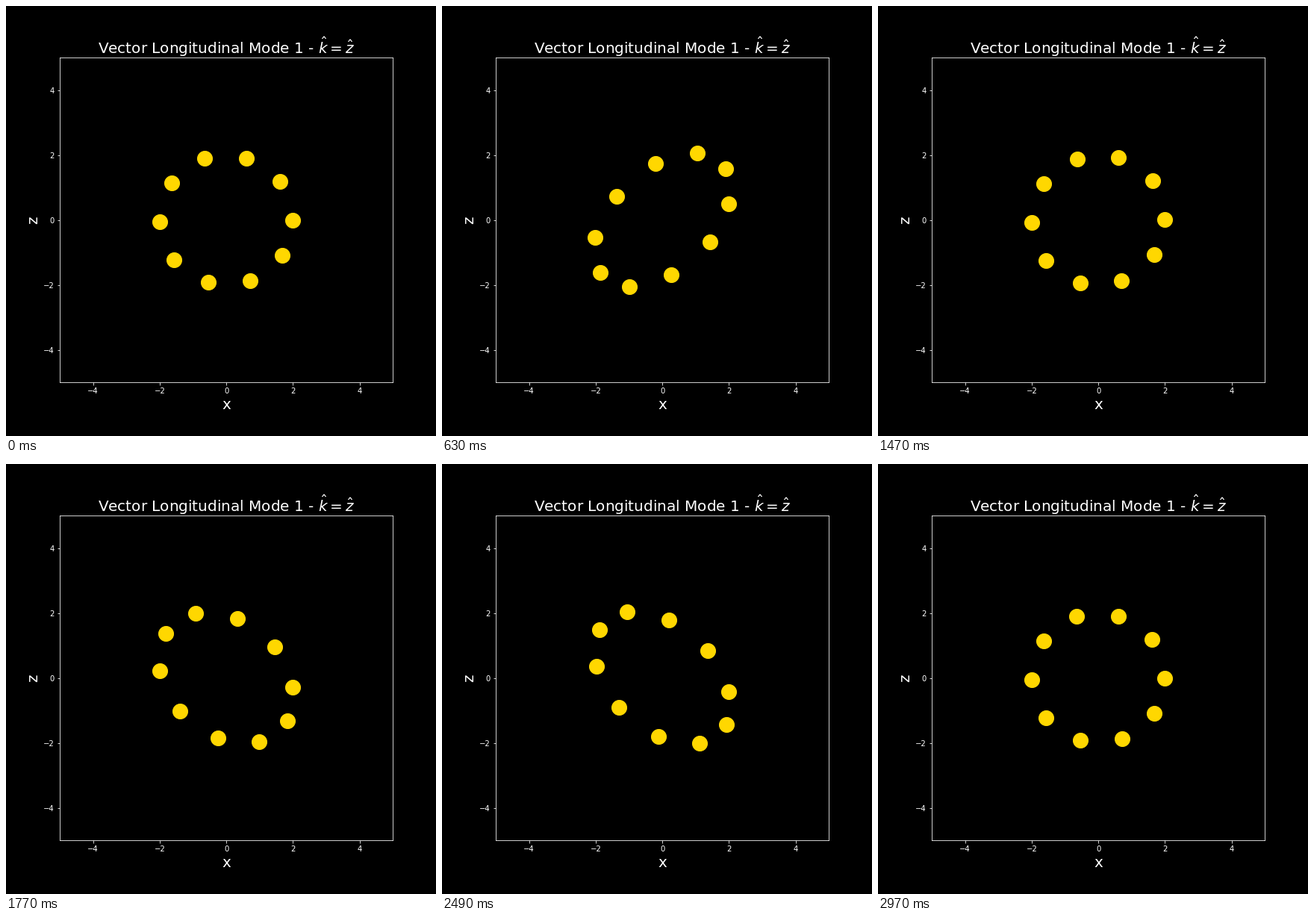
A matplotlib script that plays this animation: 576x576 px, repeating every 3000 ms.

```python
import numpy as np
import matplotlib.pyplot as plt
from matplotlib.animation import FuncAnimation

FRAMES = 100
INTERVAL = 30
RADIUS = 2.0
STRAIN = 0.25

plt.rcParams.update({
    "font.family": "DejaVu Sans",
    "font.size": 10,
    "mathtext.fontset": "dejavusans",
    "text.color": "white",
    "axes.edgecolor": "white",
    "axes.labelcolor": "white",
    "xtick.color": "white",
    "ytick.color": "white",
})

fig = plt.figure(figsize=(8, 8), dpi=72, facecolor="black")
ax = fig.add_axes([0.125, 0.125, 0.775, 0.755], facecolor="black")
ax.set(xlim=(-5, 5), ylim=(-5, 5),
       xticks=range(-4, 5, 2), yticks=range(-4, 5, 2))
ax.set_title(r"Vector Longitudinal Mode 1 - $\hat{k} = \hat{z}$", fontsize=20)
ax.set_xlabel("x", fontsize=20)
ax.set_ylabel("z", fontsize=20)

# Ring of test particles, every tenth point of a closed circle
theta = np.linspace(0, 2 * np.pi, 100)[::10]
x0, z0 = RADIUS * np.cos(theta), RADIUS * np.sin(theta)
phase = np.linspace(0, 2 * np.pi, FRAMES)

dots, = ax.plot(x0, z0, "o", color="gold", markersize=20, markeredgewidth=1)


def update(i):
    """Shear the ring in the x-z plane."""
    h = STRAIN * np.sin(phase[i])
    dots.set_data(x0 + h * z0, z0 + h * x0)
    return dots,


anim = FuncAnimation(fig, update, frames=FRAMES, interval=INTERVAL,
                     repeat=True, repeat_delay=0)
plt.show()
```
